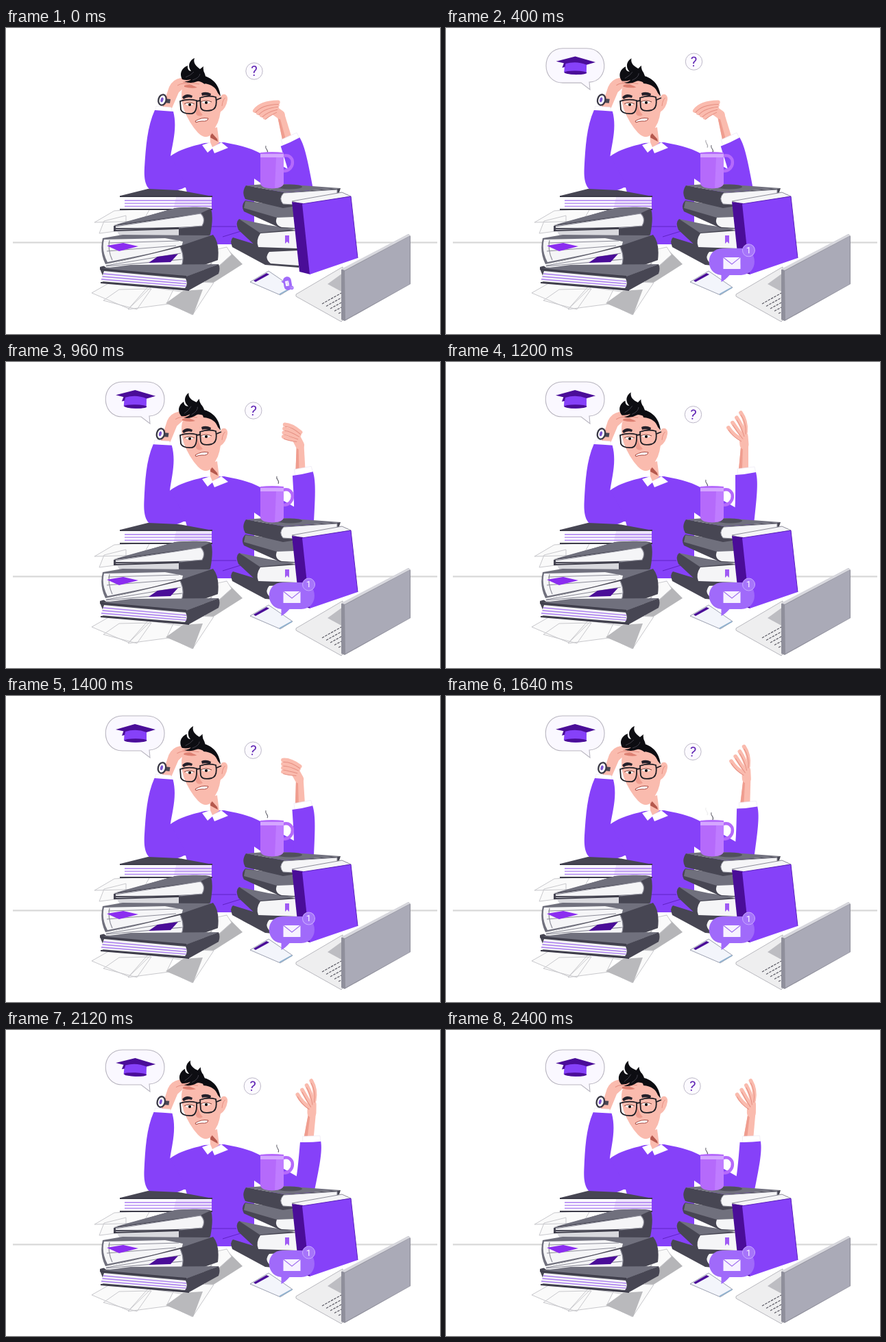
Animation of 633 by 447 pixels, one loop 2440 ms. Source, as an HTML page:

```html
<!DOCTYPE html>
<html lang="en">
<head>
<meta charset="utf-8">
<title>Overloaded student</title>
<style>
  html, body { margin: 0; width: 100%; height: 100%; overflow: hidden; background: #fff; }
  svg { display: block; width: 633px; height: 447px; }
  text { font-family: Roboto, sans-serif; text-anchor: middle; }
  .purple { fill: #8641f9; } .deep { fill: #4a0d98; } .dark { fill: #474653; } .mid { fill: #70707d; }
  .page { fill: #f5f5f7; } .white { fill: #fff; } .skin { fill: #fabbae; } .shade { fill: #ef9d8f; }
  .ink { fill: #0d0d12; } .mug { fill: #b56afb; }
  .sheet { fill: #fafafa; stroke: #c8c8cc; }
  .line { fill: none; stroke: #a97af0; stroke-width: 1.3; }
  .edge { fill: none; stroke: #8c8c98; stroke-width: 1.2; }
  .rim { fill: none; stroke: #3d3c49; stroke-width: 1.8; }
  .frame { fill: none; stroke: #1d1d24; stroke-width: 1.8; }
  .finger, .palm { fill: none; stroke: #fabbae; stroke-width: 5.8; stroke-linecap: round; }
  .palm { stroke-width: 13; }
  .crease { fill: none; stroke: #e58f82; stroke-width: 1; }
  .key { stroke: #5b5a64; stroke-width: 1.2; stroke-dasharray: 3.5 1.5; }
  .wisp { fill: none; stroke: #66656f; stroke-width: 1.1; }
</style>
</head>
<body>
<svg viewBox="0 0 633 447">
  <path d="M10 313.300H629" stroke="#d8d8d8" stroke-width="2.200"/>

  <!-- body -->
  <path class="purple" d="M240 187C255 176 275 172 290 168L318 167C345 172 362 177 376 186L428 216L440 246H400L362 220V316H285L262 233L240 232Z"/>
  <path d="M292 290H336M316 305L342 297" fill="none" stroke="#5f22c4"/>
  <path class="skin" d="M297 148L298 168L301 175L311 168L308 145Z"/>
  <path d="M299 152L308 162L309 166L298 160Z" fill="#b5584d"/>
  <path class="white" d="M286 171L298 167L301 174L314 167L324 175L304 183L301 176L294 182Z"/>

  <!-- raised arm -->
  <g id="arm">
    <path class="skin" d="M427 157L430 124Q435 114 441 122L441 155Z"/>
    <path class="shade" d="M427 157L430 124L433 122L432 156Z"/>
    <g id="hand"></g>
    <path class="white" d="M425 156L450 153L452 163L426 167Z" stroke="#e9e4f2" stroke-width=".6"/>
    <path class="purple" d="M422 165Q438 164 452 161C456 176 453 200 449 238L418 244C423 220 422 190 422 165Z"/>
  </g>

  <!-- head -->
  <path class="skin" d="M313 100C317 94 324 97 323 105Q321 118 312 123Z"/>
  <path class="crease" d="M315 114Q316 104 320 102"/>
  <path class="skin" d="M257 88Q270 74 290 72Q309 80 313 104Q315 122 309 138L300 155Q291 164 280 153Q267 139 259 118Q254 100 257 88Z"/>
  <path class="ink" d="M284 69C300 71 311 82 313 100L309 95C306 87 300 82 288 81Z"/>
  <path d="M257 101Q263 94 272 99L271 102Q264 100 259 104ZM285 95Q292 92 299 96L298 100Q291 97 286 99Z" fill="#24202a"/>
  <path d="M278 108L277 125Q280 131 287 127L283 122Z" fill="#ee9d8f"/>
  <path class="white" d="M261 111Q267 107 274 111Q268 116 261 111ZM285 108Q291 104 299 108Q293 113 285 108Z"/>
  <circle cx="268" cy="112" r="2.100"/><circle cx="292" cy="109" r="2.100"/>
  <path d="M260 111Q267 107 275 111M284 108Q291 104 300 108" fill="none" stroke="#83483f"/>
  <path class="frame" d="M254 107Q266 103 278 106Q279 124 271 125Q257 126 255 119ZM283 102Q295 98 306 101Q309 117 300 120Q286 123 284 116ZM278 107L283 106M307 105L314 102"/>
  <path d="M276 136Q285 130 295 132Q294 137 286 136Q281 136 277 138Z" fill="#fff" stroke="#a8473f"/>

  <!-- leaning arm -->
  <g id="lean">
    <path class="skin" d="M227 118L238 86Q243 75 255 73L272 75L284 80L283 84L272 84L281 90Q270 91 260 87L252 94L242 117Z"/>
    <path class="crease" d="M250 84Q259 78 272 84M258 79L282 82M229 116L235 100"/>
    <path d="M260 84Q268 81 279 87Q270 89 260 86Z" fill="#dd8072"/>
    <path class="dark" d="M231 103L240 104L239 110L231 109Z"/>
    <ellipse cx="228" cy="105" rx="5.600" ry="7.800" transform="rotate(14 228 105)" fill="#fff" stroke="#393845" stroke-width="2.300"/>
    <ellipse cx="227.500" cy="105" rx="2" ry="3.600" fill="#7c55cf" transform="rotate(14 228 105)"/>
    <path class="white" d="M219 114L241 116L242 123L218 122Z" stroke="#e9e4f2" stroke-width=".6"/>
    <path class="purple" d="M217 120Q230 121 244 122C250 145 243 168 240 187L264 231Q248 241 222 241C203 239 201 222 202 204C204 173 206 144 217 120Z"/>
  </g>
  <g id="hair">
    <path class="ink" d="M257 75C252 66 257 58 265 55Q264 62 270 63C264 55 268 47 275 44C272 52 279 57 283 60L288 56Q287 62 290 67Q293 75 290 82Q282 77 279 78Q269 82 260 78Q267 78 270 75Q263 77 257 75Z"/>
    <path d="M262 72Q270 69 274 64M272 76Q282 73 283 67" fill="none" stroke="#55525e" stroke-width=".7"/>
  </g>

  <!-- left pile -->
  <path d="M290 380L345 345L324 324L290 350Z" fill="#b5b5b8"/>
  <path class="sheet" d="M129 284L158 267L210 264L200 282ZM136 300L143 282L175 274V295ZM300 325L322 320L329 331L300 357ZM235 401L272 419L303 372L250 370ZM178 411L207 378L261 386L238 403ZM125 387L153 371L216 374L179 410ZM142 398L165 382L212 381L191 411Z"/>
  <path d="M233 402L273 419L287 382L258 384Z" fill="#b9b9bc"/>
  <path class="dark" d="M167 245L207 235L252 237L301 246Z"/>
  <path class="white" d="M173 247H300V265H173Z"/>
  <path d="M248 247H300V265H244Z" fill="#eee5fa"/>
  <g id="top-pages"></g>
  <path class="rim" d="M166 246H301M166 265H301"/>

  <path class="dark" d="M157 289L247 263Q292 260 299 264Q303 276 298 302Q292 306 252 306V293L157 297Z"/>
  <path class="mid" d="M157 288L247 263Q280 260 298 264L283 271L245 276Z"/>
  <path class="page" d="M160 289L246 277L284 271Q292 279 286 289Q255 292 160 292Z"/>
  <path class="edge" d="M160 290L246 277L284 271Q292 279 286 289L252 292"/>
  <path fill="#d9d9de" d="M160 294L252 293V306L166 304Z"/>
  <path class="rim" d="M157 296L252 293"/>

  <path class="mid" d="M141 307L170 302L300 303L258 321L145 345Q136 327 141 307Z"/>
  <path class="page" d="M143 309L232 307L258 312L256 320L148 342Q139 325 143 309Z"/>
  <path class="edge" d="M151 310Q148 324 155 339M147 326L248 318M149 314L252 311"/>
  <path d="M147 318L171 314L193 319L165 326Z" fill="#8b2df0"/>
  <path class="dark" d="M137 349L258 317L302 302Q312 314 309 339L267 354L137 353Z"/>
  <path class="page" d="M142 347L254 320Q261 334 256 348L146 350Z"/>
  <path class="edge" d="M146 347L255 329M146 348L257 338M254 320Q261 334 256 348"/>
  <path class="deep" d="M208 343L221 334L251 330L240 342Z"/>
  <path class="mid" d="M137 352L182 346L310 345L264 363Z"/>
  <path class="dark" d="M137 352L263 363L310 345Q313 351 310 359L267 383L138 372L144 369Z"/>
  <path class="page" d="M143 355L262 366Q266 374 261 380L138 370Z"/>
  <g id="low-pages"></g>
  <path class="rim" d="M137 352L263 363M138 372L267 383"/>

  <!-- right pile -->
  <path class="dark" d="M331 306Q326 310 330 320L378 346L427 350V322L370 318Z"/>
  <path class="page" d="M384 327L427 325V347L386 344Q376 336 384 327Z"/>
  <path class="dark" d="M340 279Q334 284 339 295L368 322L427 323V296L372 290Z"/>
  <path class="mid" d="M340 279L383 288L424 294L370 299Z"/>
  <path class="page" d="M371 300L425 296V322L368 320Q364 310 371 300Z"/>
  <path d="M407 303H413V315L410 312L407 315Z" fill="#a05af4"/>
  <path class="dark" d="M349 252Q342 259 347 268L400 292L424 293V264Z"/>
  <path class="mid" d="M349 253L425 262V278L395 277L347 263Z"/>
  <path class="page" d="M395 277L420 276L422 292L402 291Q391 287 395 277Z"/>
  <path class="dark" d="M350 230Q343 240 349 250L404 263L424 260L484 246L488 234L405 240Z"/>
  <path class="mid" d="M350 230L391 227L488 234L405 240Z"/>
  <ellipse cx="414" cy="232" rx="18" ry="3.500" fill="#50505b"/>
  <path class="page" d="M405 241L483 236V246L418 258L404 257Q397 249 405 241Z" stroke="#8c8c98"/>

  <g id="steam"></g>
  <path d="M404 187C422 182 423 209 404 209" fill="none" stroke="#b56afb" stroke-width="4.500"/>
  <path class="mug" d="M371 182Q388 180 405 182V227Q404 234 388 234.500Q372 234 371 227Z"/>
  <path d="M371 184H405V189H371Z" fill="#d4a6ff"/>
  <path d="M394 189H405V227Q404 233 392 234Z" fill="#bf7cff"/>

  <path class="page" d="M417 253L490 240L503 246L433 258Z" stroke="#8c8c98"/>
  <path class="deep" d="M417 254L433 256L444 360L428 356Z"/>
  <path class="purple" d="M432 257L503 246L513 336L443 360Z"/>
  <path d="M432 257L503 246L513 336" fill="none" stroke="#5a20bd"/>

  <!-- phone and laptop -->
  <path d="M356 371L383 355L418 379L400 390Z" fill="#f3f5fb" stroke="#9ba0b0" stroke-linejoin="round"/>
  <path class="deep" d="M361 369L380 358L384 360L364 371Z"/>
  <path d="M399 389L417 379" stroke="#8eb1d0" stroke-width="1.500"/>
  <path d="M423 389L491 349L494 424L489 429L423 392Z" fill="#eeeeef" stroke="#b8b8be"/>
  <path d="M469 374L491 358V386Z" fill="#bdbdc2"/>
  <g id="keyboard"></g>
  <path d="M489 353L587 301L590 304V374L494 428L489 426Z" fill="#8f8f9b"/>
  <path d="M494 355L589 304V374L495 426Z" fill="#aaaab7"/>
  <path d="M489 352L587 301L590 303L494 354Z" fill="#d7d7dd"/>

  <g id="mail">
    <path d="M403 322H430C456 322 456 361 430 361H413Q407 368 401 371V361C377 359 377 322 403 322Z" fill="#a06afa"/>
    <path d="M404 335H429V352H404Z" fill="#f7f2ff"/>
    <path d="M404 335L416.500 345L429 335" fill="none" stroke="#a170ef" stroke-width="1.200"/>
    <circle cx="441" cy="325" r="9" fill="#a675fa" stroke="#c8a9ff"/>
    <text x="441" y="329.500" font-size="13" fill="#fff">1</text>
  </g>

  <!-- thoughts -->
  <g id="thought">
    <path d="M170 29H205C239 29 239 78 209 79L210 90L197 80H170C137 80 137 29 170 29Z" fill="#faf8ff" stroke="#b9b6c0" stroke-width="1.100"/>
    <g id="cap">
      <path class="purple" d="M173 48H205V65Q189 71 172 65Z"/>
      <ellipse class="deep" cx="189" cy="65" rx="16.500" ry="2.800"/>
      <path class="deep" d="M160 49L188 41L218 49L205 53Q190 47 174 52ZM175 48L173 57L169 58L173 47Z"/>
    </g>
  </g>
  <g id="question">
    <circle r="12.200" fill="#fcfaff" stroke="#bdb9c8"/>
    <text id="mark" y="7" font-size="20" fill="#6227b5">?</text>
  </g>
</svg>
<script>
const LOOP = 2440, STEP = 40;
const $ = id => document.getElementById(id);
const move = (id, transform) => $(id).setAttribute('transform', transform);
const mix = (a, b, k) => a + (b - a) * k;
const clamp = x => Math.max(0, Math.min(1, x));
const smooth = x => (x = clamp(x)) * x * (3 - 2 * x);
const wave = (t, period) => Math.cos(2 * Math.PI * t / period);
const spring = t => Math.exp(-t / 90) * Math.cos(t / 50);

// Paths from a rule that turns an index into path data
function addPaths(id, className, count, data = () => '') {
  return Array.from({ length: count }, (_, i) => {
    const path = document.createElementNS('http://www.w3.org/2000/svg', 'path');
    path.setAttribute('class', className);
    path.setAttribute('d', data(i));
    return $(id).appendChild(path);
  });
}

addPaths('top-pages', 'line', 3, i => `M173 ${252 + 4.2 * i}H300`);
addPaths('low-pages', 'line', 3, i => `M${142 - 1.5 * i} ${359 + 4 * i}L263 ${370 + 3.6 * i}`);
addPaths('keyboard', 'key', 5, i => `M${461 + 6 * i} ${403 + 3.5 * i}L491 ${386 + 7 * i}`);
const [palm] = addPaths('hand', 'palm', 1);
const fingers = addPaths('hand', 'finger', 4);
const creases = addPaths('hand', 'crease', 4);
const steam = addPaths('steam', 'wisp', 3);

// The arm eases from pose to pose: [time, angle]
const poses = [[0, -15], [400, -15], [760, -3.5], [1200, 2], [1400, -1.5], [1840, 7.5], [LOOP, 7]];
function armAngle(t) {
  const i = poses.findIndex(([time]) => time > t);
  const [t0, a] = poses[i - 1], [t1, b] = poses[i];
  return mix(a, b, smooth((t - t0) / (t1 - t0)));
}

function drawHand(open) {
  palm.setAttribute('d', `M435 121L${mix(425, 434, open)} 108`);
  fingers.forEach((finger, i) => {
    const bendX = mix(419 - 2 * i, 419 + 6.5 * i, open), bendY = mix(115 - 6.5 * i, 107 - 7 * i, open);
    const tipX = mix(412 - 3.7 * i, 412 + 6 * i, open), tipY = mix(118 - 4.5 * i, 96 - 7.3 * i, open);
    const stroke = dy => `M${431 + 2 * i} ${113 - 3.5 * i + dy}Q${bendX} ${bendY + dy} ${tipX} ${tipY + dy}`;
    finger.setAttribute('d', stroke(0));
    creases[i].setAttribute('d', stroke(3));
  });
}

function drawSteam(t) {
  steam.forEach((wisp, i) => {
    const age = ((t + 150 - 370 * i) % 1200 + 1200) % 1200 / 600;
    wisp.setAttribute('opacity', clamp((1 - age) * 7));
    wisp.setAttribute('d', `M${381 + 8 * i} ${192 - 18 * Math.sqrt(age)}c3 -5 -4 -6 -2 -11`);
  });
}

function draw(t) {
  const angle = armAngle(t), sway = wave(t, 1640), bounce = spring(t);
  move('arm', `rotate(${angle - 2} 437 240)`);
  drawHand(clamp((angle + 4) / 6));
  move('lean', `rotate(${0.6 * (sway - 1)} 225 236)`);
  move('hair', `rotate(${7 * (sway - 1)} 275 82)`);

  const lift = 17 * Math.sin(Math.PI * clamp(t / 1000));
  move('question', `translate(${362 - t / 800} ${63 + 19 * smooth(t / 1840) - lift})`);
  move('mark', `rotate(${10 * smooth(t / 1600)})`);

  move('mail', `translate(401.5 370) rotate(${80 * bounce}) scale(${1 - 0.7 * bounce}) translate(-401 -370)`);
  move('thought', `translate(210 90) scale(${t ? 1 - spring(t - STEP) : 0}) translate(-210 -90)`);
  move('cap', `rotate(${1 - wave(t, 1400)} 189 54)`);
  drawSteam(t);
}

const begin = performance.now();
function tick() {
  const t = (performance.now() - begin) % LOOP;
  draw(Math.floor(t / STEP) * STEP);
  requestAnimationFrame(tick);
}
tick();
</script>
</body>
</html>
```
